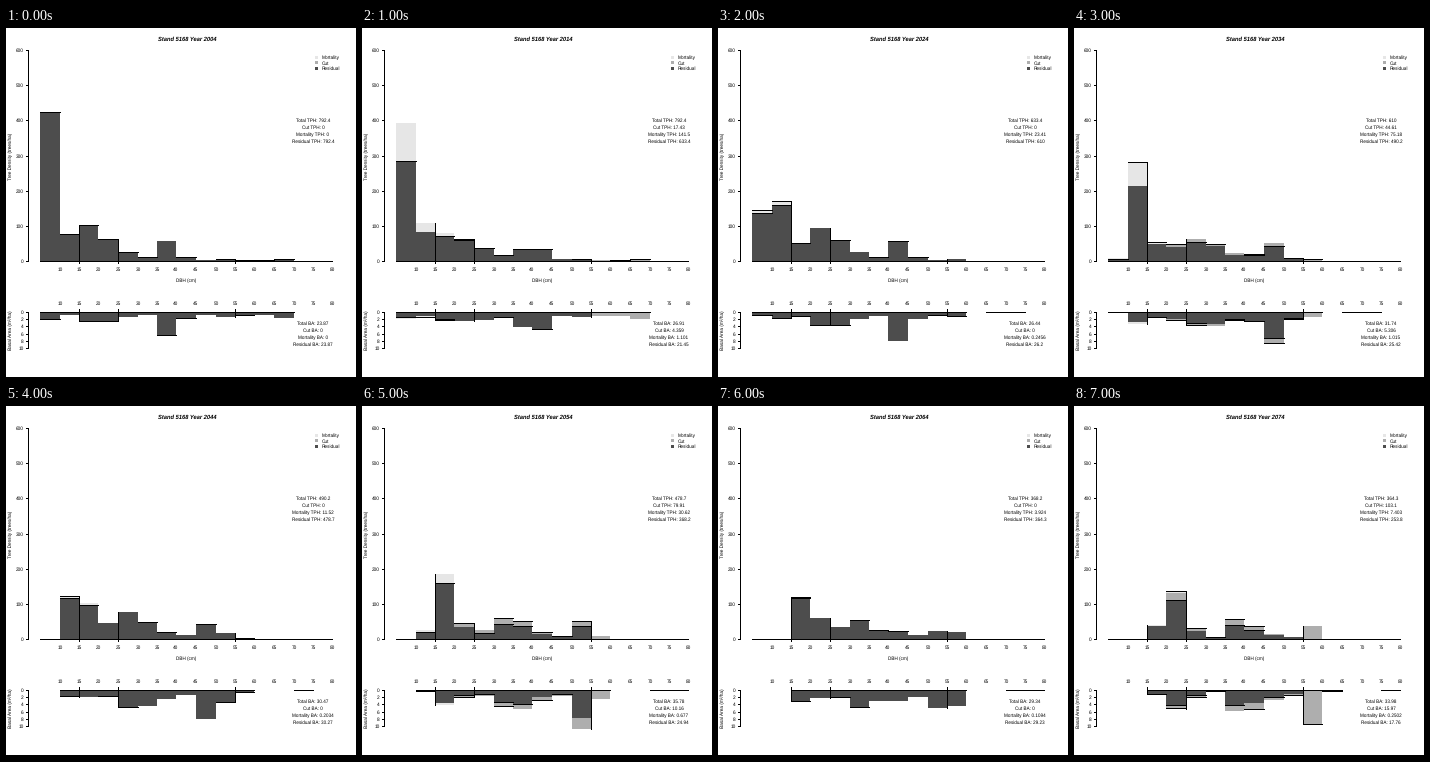
Animation, 350 px wide and 350 px high, one loop 8 s. Source, as a matplotlib script:

```python
import numpy as np
import matplotlib.pyplot as plt
from matplotlib.animation import ArtistAnimation
from matplotlib.patches import Rectangle

SIZE, DPI = 350, 100
plt.rcParams["font.family"] = "Liberation Sans"
plt.rcParams["text.hinting"] = "none"

SHADES = ("#4d4d4d", "#aeaeae", "#e6e6e6")   # residual, cut, mortality
LEFT, BIN = 34, 19.5
TOP_ZERO, TOP_UNIT = 233, 211 / 600
LOW_ZERO, LOW_UNIT = 284, 3.6
DARK_EDGES = (2, 4, 10)                      # bin edges drawn as black lines

DECADES = 8
CLASSES = np.arange(5, 81, 5)
# Trees per hectare in each 5 cm diameter class at the start.
START = [423.4, 77, 102, 63, 25, 11, 58, 12, 4, 6, 3, 3, 5]
SAMPLES = 40

fig = plt.figure(figsize=(SIZE / DPI, SIZE / DPI), dpi=DPI, facecolor="white")
ax = fig.add_axes([0, 0, 1, 1])
ax.set_xlim(0, SIZE)
ax.set_ylim(SIZE, 0)
ax.axis("off")


def edge(i):
    return round(LEFT + BIN * i)


def box(x0, y0, x1, y1, color="black", z=2):
    return ax.add_patch(Rectangle((x0, min(y0, y1)), x1 - x0, abs(y1 - y0),
                                  fc=color, ec="none", lw=0,
                                  antialiased=False, zorder=z))


def hline(x0, x1, y):
    return box(x0, y, x1 + 1, y + 1, z=3)


def vline(x, y0, y1):
    return box(x, min(y0, y1), x + 1, max(y0, y1) + 1, z=3)


def text(x, y, s, px=4.6, **kw):
    kw = {"ha": "center", "va": "center", "zorder": 4, **kw}
    return ax.text(x, y, s, fontsize=px * 72 / DPI, color="black", **kw)


def grow_stand():
    """Yield (diameter, residual, cut, dead) of all sample trees per decade."""
    mid = np.repeat(7.5 + 5 * np.arange(len(START)), SAMPLES)
    spread = np.tile((np.arange(SAMPLES) + .5) / SAMPLES - .5, len(START))
    first = mid + spread * np.where(mid < 10, 5, 3)
    trees = np.repeat(START, SAMPLES) / SAMPLES
    rate = np.minimum(np.minimum(1.75 + .065 * mid, 3), 5 - .053 * mid)
    lag = np.maximum(.6, 2.4 - .07 * mid)
    legacy = np.where(mid > 65, .02, 0)      # a few old trees always stay

    for n in range(DECADES):
        d = first + np.maximum(0, rate * n - lag)
        harvest = n % 2
        thin = min(.3, .06 * n - .03) * (d > 22)
        cut = harvest * trees * np.where(d >= 55, 1 - legacy, thin)
        risk = .28 / (1 + np.exp((d - 17) / 2.5))
        dead = (trees - cut) * risk * (1 if harvest else .25) * (n > 0)
        trees = trees - cut - dead
        yield d, trees, cut, dead


def stack(i, parts, zero, unit):
    """One stacked bar; a negative unit makes it grow downwards."""
    x0, x1 = edge(i), edge(i + 1)
    art, total, y = [hline(x0, x1, zero)], 0, zero
    for k, (value, color) in enumerate(zip(parts, SHADES)):
        if value * abs(unit) < .5 and k:
            continue
        total += value
        exact = zero - total * unit
        end = round(exact)
        art.append(box(x0, y, x1, end, color))
        # hairlines show only on whole pixels
        if round(2 * exact) % 2 == 0:
            art.append(hline(x0, x1, end))
        y = end
    art += [vline(edge(j), zero, y)
            for j in (i, i + 1) if j in DARK_EDGES and y != zero]
    return art


def stats(kind, parts, y):
    res, cut, dead = (p.sum() for p in parts)
    rows = (("Total", res + cut + dead), ("Cut", cut),
            ("Mortality", dead), ("Residual", res))
    return [text(307, y + 7.2 * k, f"{name} {kind}: {value:.4g}")
            for k, (name, value) in enumerate(rows)]


def draw_year(n, d, *groups):
    art = [text(181, 11, f"Stand 5168 Year {2004 + 10 * n}", 5.8,
                weight="bold", style="italic")]
    basal = np.pi / 40000 * d ** 2
    panels = (("TPH", 1, TOP_ZERO, TOP_UNIT, 92.3),
              ("BA", basal, LOW_ZERO, -LOW_UNIT, 295.5))
    for kind, weight, zero, unit, y in panels:
        parts = np.array([np.histogram(d, CLASSES, weights=g * weight)[0]
                          for g in groups])
        for i, bar in enumerate(parts.T):
            if bar.sum() > 1e-9:
                art += stack(i, bar, zero, unit)
        art += stats(kind, parts, y)
    return art


def y_axis(zero, unit, values):
    ys = [round(zero - v * unit) for v in values]
    vline(22, ys[0], ys[-1])
    for v, y in zip(values, ys):
        hline(20, 22, y)
        text(17.5, y + .5, str(v), 4.8, ha="right")


def draw_axes():
    y_axis(TOP_ZERO, TOP_UNIT, range(0, 601, 100))
    y_axis(LOW_ZERO, -LOW_UNIT, range(0, 11, 2))
    hline(LEFT, edge(15), TOP_ZERO)
    for i in range(1, 16):
        for y in (242, 276):
            text(edge(i), y, str(CLASSES[i]), 4.8)
        if i in DARK_EDGES:
            vline(edge(i), TOP_ZERO, TOP_ZERO + 2)
            vline(edge(i), LOW_ZERO - 3, LOW_ZERO)
    text(180, 253, "DBH (cm)")
    text(5, 128, "Tree Density (trees/ha)", rotation=90)
    text(5, 302, "Basal Area (m²/ha)", 4.8, rotation=90)
    for k, name in enumerate(("Mortality", "Cut", "Residual")):
        y = 30 + 5.5 * k
        box(309, int(y) - 2, 312, int(y) + 1, SHADES[2 - k])
        text(316, y, name, 4.8, ha="left")
    hline(0, SIZE, SIZE - 1)


draw_axes()
frames = [draw_year(n, *state) for n, state in enumerate(grow_stand())]
anim = ArtistAnimation(fig, frames, interval=1000, repeat=True, repeat_delay=0)
plt.show()
```
